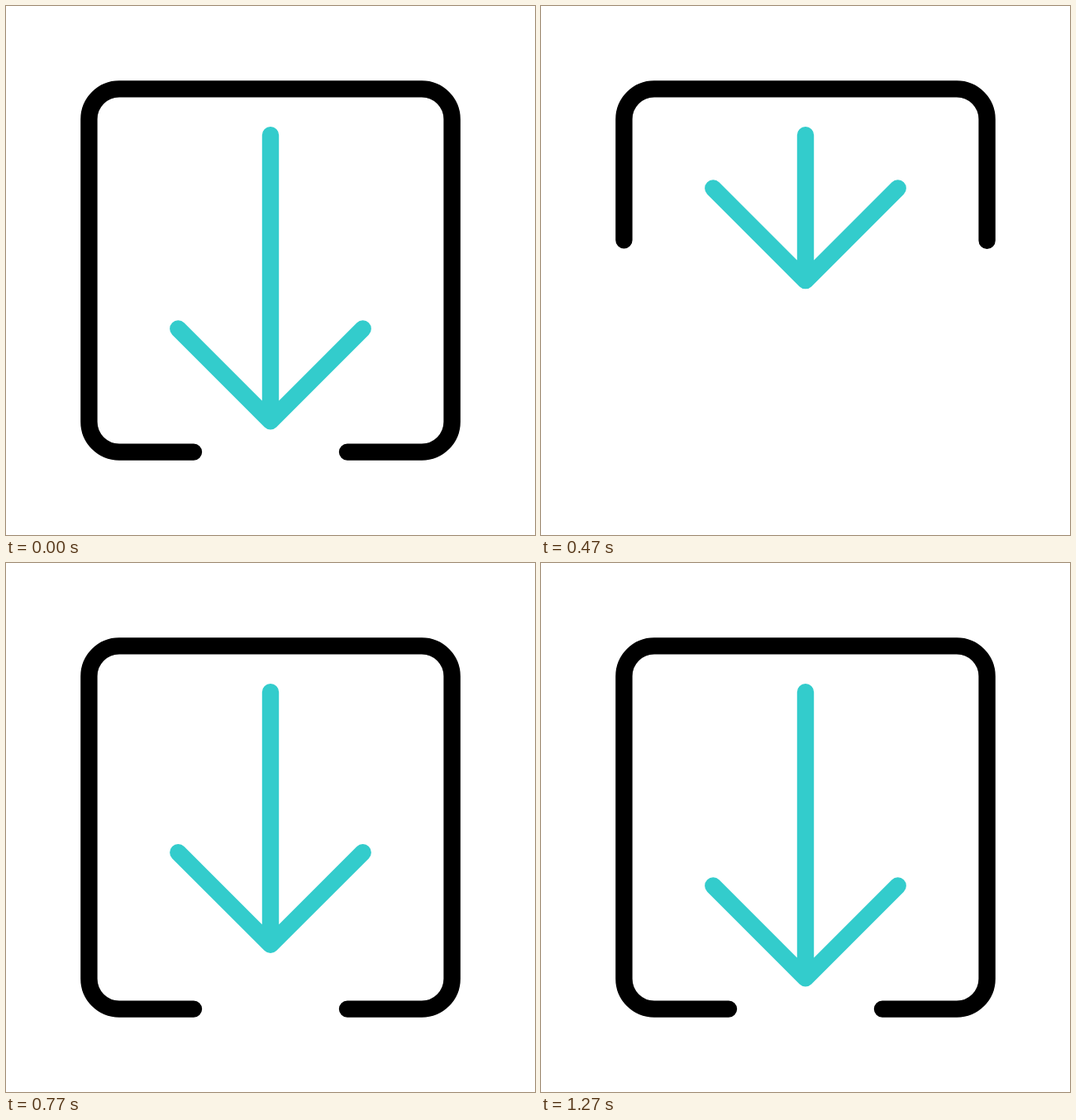
Recreate the animation shown at these times as an HTML page with a canvas. Size 640 by 640 pixels, loop 2 s.

```html
<!DOCTYPE html>
<html lang="en">
<head>
<meta charset="utf-8">
<title>Download icon</title>
<style>
  html, body { margin: 0; width: 100%; height: 100%; overflow: hidden; background: #fff; }
  canvas { display: block; width: 640px; height: 640px; }
</style>
</head>
<body>
<canvas id="stage" width="640" height="640"></canvas>
<script>
const ctx = document.getElementById('stage').getContext('2d');
const LOOP = 2000;
const FPS = 30;

// Box outline, on the centre of the stroke
const LOW = 100.4, HIGH = 539.6, RADIUS = 36.6;
const GAP_LEFT = 227, GAP_RIGHT = 413;
const SIDE = HIGH - LOW - 2 * RADIUS;
const FOOT = GAP_LEFT - LOW - RADIUS;
const OUTLINE = 2 * FOOT + 3 * SIDE + 2 * Math.PI * RADIUS;

const outline = new Path2D();
outline.moveTo(GAP_LEFT, HIGH);
outline.arcTo(LOW, HIGH, LOW, LOW, RADIUS);
outline.arcTo(LOW, LOW, HIGH, LOW, RADIUS);
outline.arcTo(HIGH, LOW, HIGH, HIGH, RADIUS);
outline.arcTo(HIGH, HIGH, LOW, HIGH, RADIUS);
outline.lineTo(GAP_RIGHT, HIGH);

// Slow start, nearly linear finish
const rise = (x, bend, pivot) => x - bend * x * (1 - x) * (pivot - x);

// One hop: eased climb to the peak, then a free fall
function hop(frame, { start, top, land, height, bend, pivot }) {
  if (frame <= start || frame >= land) return 0;
  if (frame < top) return height * rise((frame - start) / (top - start), bend, pivot);
  return height * (1 - ((frame - top) / (land - top)) ** 2);
}

const arrowEase = { bend: 0.77, pivot: 0.775 };
const arrowHops = [
  { start: 0, top: 13, land: 19.25, height: 174.5, ...arrowEase },
  { start: 19.25, top: 25.5, land: 29.65, height: 71, ...arrowEase },
  { start: 29.65, top: 34, land: 38, height: 70.4, ...arrowEase }
];
const outlineHop = { start: 0, top: 13, land: 19.86, height: 375, bend: 0.647, pivot: 0.7915 };

function drawOutline(trim) {
  ctx.strokeStyle = '#000';
  ctx.setLineDash([OUTLINE - 2 * trim, 2 * OUTLINE]);
  ctx.lineDashOffset = -trim;
  ctx.stroke(outline);
  ctx.setLineDash([]);
}

function drawArrow(lift) {
  const tip = 502.2 - lift, arm = 111.7;
  ctx.strokeStyle = '#33cccc';
  ctx.beginPath();
  ctx.moveTo(320, 156.2);
  ctx.lineTo(320, tip);
  ctx.moveTo(320 - arm, tip - arm);
  ctx.lineTo(320, tip);
  ctx.lineTo(320 + arm, tip - arm);
  ctx.stroke();
}

function draw(now) {
  // Steps fall on hundredths of a second, hence the small lead
  const frame = Math.floor((now % LOOP + 3.4) * FPS / 1000);
  ctx.fillStyle = '#fff';
  ctx.fillRect(0, 0, 640, 640);
  ctx.lineWidth = 20.4;
  ctx.lineCap = ctx.lineJoin = 'round';
  drawOutline(hop(frame, outlineHop));
  drawArrow(arrowHops.reduce((sum, h) => sum + hop(frame, h), 0));
}

function tick() {
  draw(performance.now());
  requestAnimationFrame(tick);
}
tick();
</script>
</body>
</html>
```
